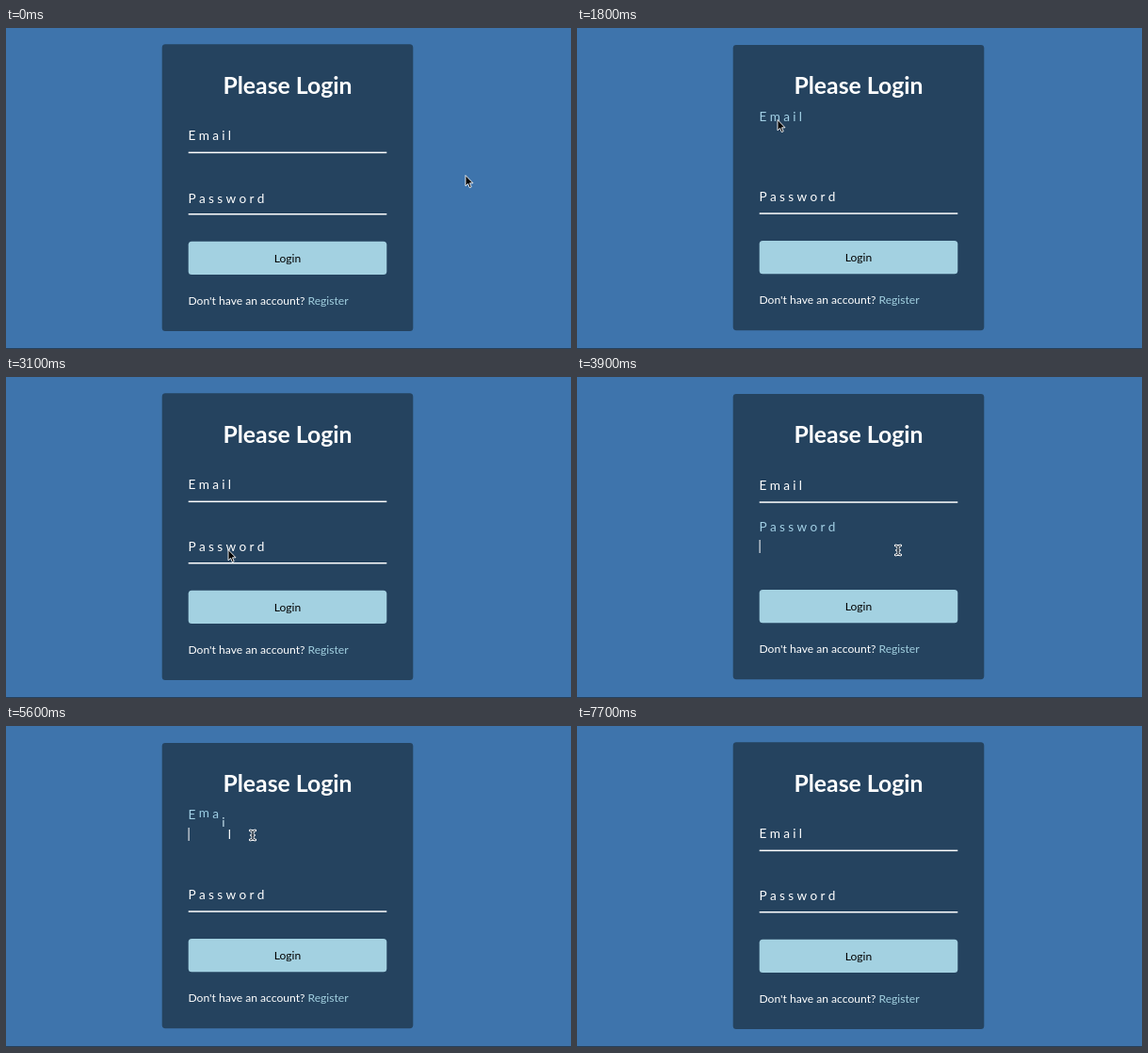
An HTML page for the animation above (9 s loop, 600x341 px).

```html
<!DOCTYPE html>
<html lang="en">
<head>
<meta charset="utf-8">
<title>Login form</title>
<style>
/* 1 while the email field, the password field or the menu is active */
@property --e { syntax: "<number>"; inherits: true; initial-value: 0; }
@property --p { syntax: "<number>"; inherits: true; initial-value: 0; }
@property --menu { syntax: "<number>"; inherits: true; initial-value: 0; }

html, body { margin: 0; width: 100%; height: 100%; overflow: hidden; background: #3e74ac; }
#stage {
  --any: calc(var(--e) + var(--p));
  position: relative; width: 600px; height: 341px; overflow: hidden;
  background: #3e74ac; font-family: Lato, "Open Sans", sans-serif;
  animation: email 9s step-end infinite, password 9s step-end infinite, menu 9s step-end infinite;
}
svg { position: absolute; left: 0; top: 0; }
svg text { font-size: 12.1px; fill: #fff; }
svg .title { font-size: 24.8px; font-weight: 700; }
svg .menu text { font: 9.2px Inter, "Liberation Sans", sans-serif; }
.mid { text-anchor: middle; }

/* a focused field loses its border, so the centred card shrinks a little */
.card { transform-origin: 299px 169.65px; transform: scaleY(calc(1 - .0046 * var(--any))); }
.top { transform: translateY(calc(.7px * var(--any))); }
.bottom { transform: translateY(calc(-.7px * var(--any))); }
.second { transform: translateY(calc(.7px * (var(--p) - var(--e)))); }
.line1 { opacity: calc(1 - var(--e)); }
.line2 { opacity: calc(1 - var(--p)); }
.menu { opacity: var(--menu); }

.label {
  position: absolute; left: 0; top: 0; color: #fff;
  font-size: 13.6px; line-height: 20px; letter-spacing: 3.3px; white-space: nowrap;
}
.label span {
  display: inline-block;
  animation: 9s cubic-bezier(.68, -.55, .265, 1.55) calc(var(--i) * 50ms) infinite;
}
#mail { transform: translate(193.5px, calc(104.2px + .7px * var(--any))); }
#mail span { animation-name: wave1; }
#pass {
  transform: translate(193.5px, calc(169.7px + .7px * (var(--p) - var(--e))));
  animation: settle 9s step-end infinite;
}
#pass span { animation-name: wave2; }

.caret1 { animation: caret1 9s step-end infinite; }
.caret2 { opacity: var(--p); }
.pointer { animation: move 9s infinite; }
.arrow { animation: arrow 9s step-end infinite; }
.beam { animation: beam 9s step-end infinite; }

@keyframes email {
  0%, 22%, 71.444%, 100% { --e: 0; }
  11.333%, 58.889% { --e: 1; }
}
@keyframes password {
  0%, 45.111%, 100% { --p: 0; }
  35.333% { --p: 1; }
}
@keyframes menu {
  0%, 71.444%, 100% { --menu: 0; }
  65% { --menu: 1; }
}
@keyframes wave1 {
  0%, 11.333%, 25.333%, 58.889%, 74.778%, 100% { transform: translateY(0); color: #fff; }
  14.667%, 22%, 62.222%, 71.444% { transform: translateY(-21px); color: #a3d1e6; }
}
@keyframes wave2 {
  0%, 35.333%, 48.444%, 100% { transform: translateY(0); color: #fff; }
  38.667%, 45.111% { transform: translateY(-21px); color: #a3d1e6; }
}
@keyframes settle { 0% { top: 1px; } 5.556%, 100% { top: 0; } }
@keyframes caret1 {
  0%, 17.778%, 64.444%, 100% { opacity: 0; }
  11.333%, 58.889% { opacity: 1; }
}
@keyframes arrow {
  0%, 20%, 44.444%, 67.778% { opacity: 1; }
  13.333%, 36.667%, 57.778%, 85.556%, 100% { opacity: 0; }
}
@keyframes beam {
  0%, 20%, 44.444%, 67.778%, 100% { opacity: 0; }
  13.333%, 36.667%, 57.778% { opacity: 1; }
}
/* the pointer jumps every 100 ms */
@keyframes move {
  0% { transform: translate(488px, 156px); animation-timing-function: steps(2); }
  2.222% { transform: translate(440px, 140px); animation-timing-function: steps(2); }
  4.444% { transform: translate(350px, 108px); animation-timing-function: steps(2); }
  6.667% { transform: translate(270px, 92px); animation-timing-function: steps(1); }
  7.778% { transform: translate(245px, 91px); animation-timing-function: steps(3); }
  11.111% { transform: translate(214px, 108px); animation-timing-function: steps(1); }
  12.222%, 18.889% { transform: translate(212px, 112px); animation-timing-function: steps(1); }
  20% { transform: translate(213px, 97px); animation-timing-function: steps(1); }
  21.111% { transform: translate(217px, 45px); animation-timing-function: steps(1); }
  22.222%, 28.889% { transform: translate(222px, 3px); animation-timing-function: steps(1); }
  30% { transform: translate(223px, 20px); animation-timing-function: steps(4); }
  34.444%, 35.556% { transform: translate(236px, 183px); animation-timing-function: steps(2); }
  37.778% { transform: translate(262px, 182px); animation-timing-function: steps(5); }
  43.333% { transform: translate(341px, 184px); animation-timing-function: steps(1); }
  44.444% { transform: translate(440px, 172px); animation-timing-function: steps(1); }
  45.556% { transform: translate(462px, 165px); animation-timing-function: steps(3); }
  48.889%, 53.333% { transform: translate(453px, 163px); animation-timing-function: steps(1); }
  54.444% { transform: translate(430px, 158px); animation-timing-function: steps(2); }
  56.667% { transform: translate(299px, 141px); animation-timing-function: steps(2); }
  58.889%, 64.444% { transform: translate(262px, 116px); animation-timing-function: steps(2); }
  66.667% { transform: translate(380px, 122px); animation-timing-function: steps(2); }
  68.889% { transform: translate(537px, 131px); animation-timing-function: steps(2); }
  71.111%, 100% { transform: translate(528px, 137px); }
}
</style>
</head>
<body>
<div id="stage">
  <svg width="600" height="341">
    <rect y="340" width="600" height="1" fill="#263f5a"/>
    <rect class="card" x="165.7" y="17.3" width="266.6" height="304.7" rx="3.5" fill="#25435f"/>
    <g class="top">
      <text class="title mid" x="299" y="69.8">Please Login</text>
      <rect class="line1" x="193.7" y="131.6" width="210.6" height="1.5" fill="#fff"/>
    </g>
    <g class="second">
      <rect class="line2" x="193.7" y="197" width="210.6" height="1.5" fill="#fff"/>
    </g>
    <g class="bottom">
      <rect x="193.7" y="226.7" width="210.6" height="35.2" rx="3.5" fill="#a3d1e1"/>
      <text class="mid" x="299" y="248.6" style="fill:#000">Login</text>
      <text x="193.5" y="294.2">Don't have an account? <tspan fill="#a3d1e1">Register</tspan></text>
    </g>
  </svg>

  <div class="label" id="mail">Email</div>
  <div class="label" id="pass">Password</div>

  <svg width="600" height="341">
    <rect class="caret1" x="193.6" y="108" width="1" height="14" fill="#fff"/>
    <rect class="caret2" x="193.6" y="173" width="1" height="14" fill="#fff"/>
    <g class="menu">
      <rect x="193.7" y="133" width="210.6" height="63.3" rx="3" fill="#222326"/>
      <text x="202" y="155.3">demo@mail.test</text>
      <text x="202" y="180.3">tobrendlask@post.test</text>
    </g>
    <g class="pointer">
      <path class="arrow" d="M0 .5V11.8L2.6 9.4 4.3 13.6 6.2 12.8 4.5 8.8H8Z"
            fill="#000" stroke="#fff" stroke-width=".9" stroke-linejoin="round"/>
      <g class="beam" fill="none" stroke-linecap="round">
        <path id="ibeam" d="M-2.6-5Q0-5 0-3V3Q0 5-2.6 5M2.6-5Q0-5 0-3V3Q0 5 2.6 5M-1.3 0H1.3"
              stroke="#fff" stroke-width="2.6"/>
        <use href="#ibeam"/>
        <path d="M-2.6-5Q0-5 0-3V3Q0 5-2.6 5M2.6-5Q0-5 0-3V3Q0 5 2.6 5M-1.3 0H1.3"
              stroke="#1a2836" stroke-width="1"/>
      </g>
    </g>
  </svg>
</div>
<script>
// one span per letter, so the labels can rise as a wave
for (const label of document.querySelectorAll(".label")) {
  label.innerHTML = [...label.textContent]
    .map((c, i) => `<span style="--i:${i}">${c}</span>`)
    .join("");
}
</script>
</body>
</html>
```
